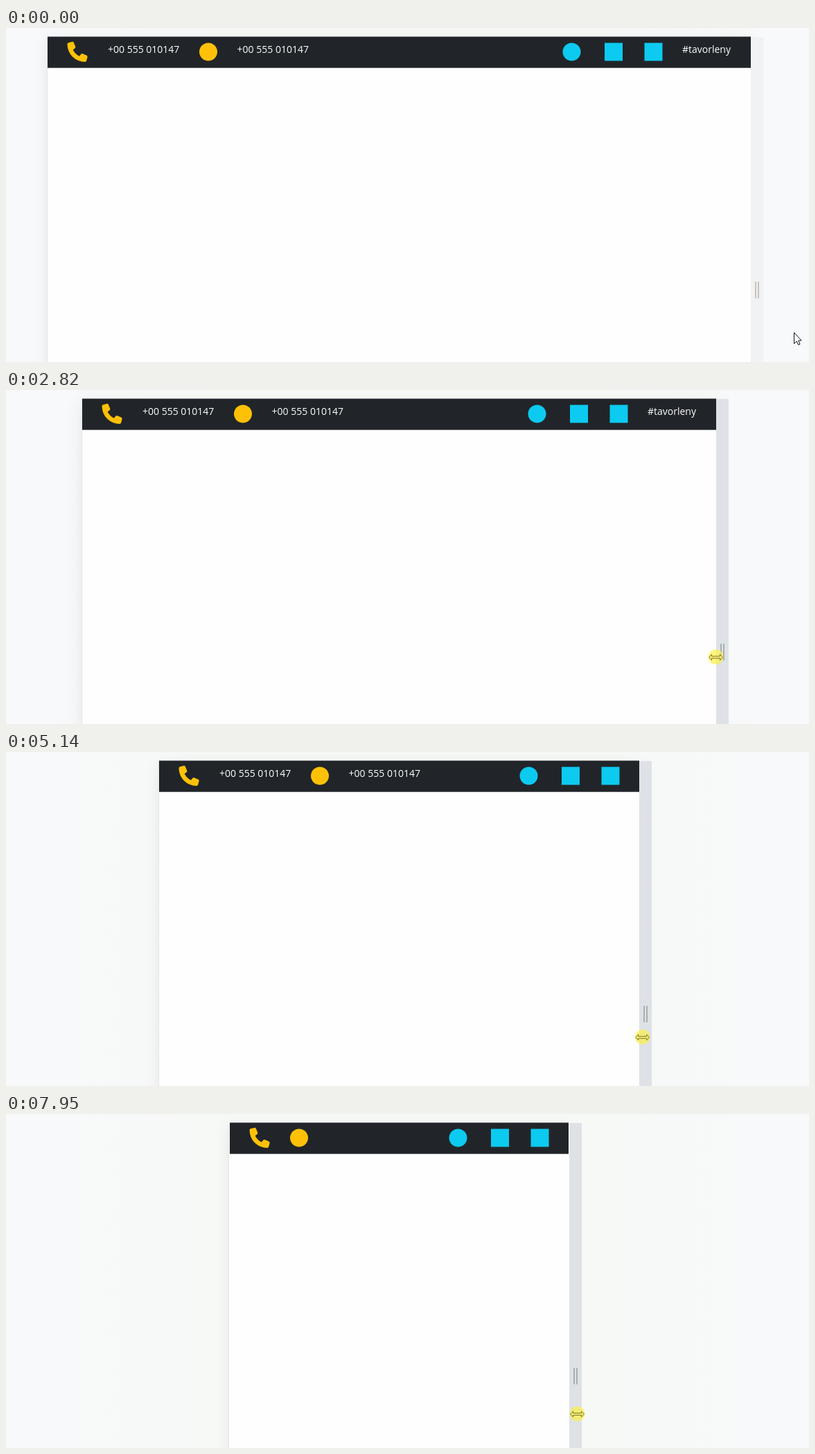
These frames come from a looping animation (1159 by 483 pixels, 8 s). An HTML page:

```html
<!DOCTYPE html>
<html lang="en">
<head>
<meta charset="utf-8">
<title>Responsive top bar</title>
<style>
  html, body { margin: 0; width: 100%; height: 100%; overflow: hidden; background: #f7f9fa; }
  svg { display: block; }
  text { font: 14px "Open Sans", "Noto Sans", sans-serif; fill: #fff; }
  #panel { fill: #fefefe; filter: drop-shadow(0 6px 11px rgba(0, 0, 0, .08)); }
  .warn { fill: #ffc107; }
  .info { fill: #0dcaf0; }
</style>
</head>
<body>
<svg width="1159" height="483" viewBox="0 0 1159 483">
  <defs>
    <linearGradient id="back">
      <stop offset="0" stop-color="#f8f9fb"/>
      <stop offset=".25" stop-color="#f7f9f7"/>
      <stop offset=".75" stop-color="#f7f9f7"/>
      <stop offset="1" stop-color="#f8f9fb"/>
    </linearGradient>
  </defs>
  <rect width="1159" height="483" fill="url(#back)"/>
  <rect id="panel" y="12.5" height="520"/>
  <rect id="edge" y="13" width="1" height="470" fill="#e3e6e5"/>
  <rect id="bar" y="12.5" height="45.2" fill="#212529"/>

  <g id="left">
    <path class="warn" transform="translate(28.5 19.8) scale(.455)" d="M20.6 3A5 5 0 0 0 14.7 .2L3.7 3.2A5 5 0 0 0 0 8A56 56 0 0 0 56 64A5 5 0 0 0 60.8 60.3L63.8 49.3A5 5 0 0 0 60.9 43.4L48.9 38.4A5 5 0 0 0 43.1 39.9L38.1 46A42 42 0 0 1 18 25.9L24.2 20.9A5 5 0 0 0 25.6 15.1Z"/>
    <text class="phone" x="87" y="36">+00 555 010147</text>
    <circle id="chat" class="warn" cy="34.5" r="13"/>
    <text class="phone" x="273.6" y="36">+00 555 010147</text>
  </g>

  <g id="social" class="info">
    <circle cx="-159.5" cy="34.5" r="13"/>
    <rect x="-112" y="21.5" width="26" height="26"/>
    <rect x="-54.5" y="21.5" width="26" height="26"/>
  </g>
  <text id="tag" y="36">#tavorleny</text>

  <g id="handle">
    <rect id="strip" y="13" width="18" height="470"/>
    <path id="grip" d="M7 367V391M11 367V391" stroke-width="1.5"/>
  </g>

  <path id="arrow" d="M.5 .5V16.5L4.2 13L6.6 18.2L9 17.2L6.7 12H11.2Z" fill="#fff" stroke="#111"/>
  <g id="resize">
    <circle id="press" r="10.8" fill="#fdf03c" fill-opacity=".66"/>
    <path id="arrows" d="M-10 .5L-6-3.7V-1H6V-3.7L10 .5L6 4.7V2H-6V4.7Z"/>
  </g>
</svg>

<script>
const LOOP = 8000, STEP = 66, CENTRE_SUM = 1135;
const TAG_MIN = 893, PHONE_MIN = 691;
const ARRIVE = 860, PRESS = 1190;

// Drag: time, panel left, pointer x, pointer y
const drag = [
  [1520, 60, 1082.5, 374.5],
  [1590, 61, 1077.5, 375.5],
  [2820, 109.5, 1024.5, 386],
  [4410, 183, 956.5, 405],
  [5930, 263, 877.5, 420],
  [7080, 324, 816.5, 432.5],
  [7340, 328.5, 812, 433],
  [7600, 328.5, 812, 433],
  [7950, 322, 824.5, 433.5]
];

const el = id => document.getElementById(id);
const phones = document.querySelectorAll(".phone");
const set = (id, attrs) => {
  for (const name in attrs) el(id).setAttribute(name, attrs[name]);
};
const move = (id, x, y = 0) => set(id, { transform: `translate(${x} ${y})` });
const show = (node, on) => node.setAttribute("visibility", on ? "visible" : "hidden");
const clamp = k => Math.min(1, Math.max(0, k));
const frame = t => Math.floor(t / STEP);

function bezier(a, b, c, d, k) {
  const m = 1 - k;
  return m * m * m * a + 3 * m * m * k * b + 3 * m * k * k * c + k * k * k * d;
}

// Panel edge and pointer, both held for one screen refresh.
function pose(t) {
  const f = frame(t);
  if (t < drag[0][0]) {
    const k = clamp(f / frame(ARRIVE));
    return [60, bezier(1137, 1160, 1145, 1082.5, k), bezier(440, 395, 350, 374.5, k)];
  }
  let i = 0;
  while (i < drag.length - 2 && t >= drag[i + 1][0]) i++;
  const [t0, ...a] = drag[i], [t1, ...b] = drag[i + 1];
  const k = clamp((f - frame(t0)) / (frame(t1) - frame(t0)));
  const [left, x, y] = a.map((v, j) => v + (b[j] - v) * k);
  return [Math.round(left), x, y];
}

function draw(t) {
  const [left, px, py] = pose(t);
  const right = CENTRE_SUM - left;

  // The page inside repaints one step late while the panel widens.
  const barLeft = Math.max(left, pose(t - STEP)[0]);
  const barRight = CENTRE_SUM - barLeft;
  const width = barRight - barLeft;
  const hasPhone = width >= PHONE_MIN, hasTag = width >= TAG_MIN;

  set("panel", { x: left, width: right - left });
  set("edge", { x: left - 1 });
  set("bar", { x: barLeft, width });
  move("left", barLeft);
  set("chat", { cx: hasPhone ? 232 : 100 });
  phones.forEach(p => show(p, hasPhone));
  move("social", barRight - (hasTag ? 99 : 0));
  move("tag", barRight - 99);
  show(el("tag"), hasTag);

  const hover = px < right + 18, pressed = t >= PRESS;
  move("handle", right);
  set("strip", { fill: hover ? "#dee2e6" : "#f1f2f4" });
  set("grip", { stroke: hover ? "#98a09a" : "#bcb4a2" });

  move("arrow", px, py);
  move("resize", px, py);
  show(el("arrow"), !hover);
  show(el("resize"), hover);
  set("press", { "fill-opacity": pressed ? .66 : 0 });
  set("arrows", pressed
    ? { fill: "#f3ea78", stroke: "#7d7626" }
    : { fill: "#fff", stroke: "#111" });
}

const origin = performance.now();
function tick() {
  draw((performance.now() - origin) % LOOP);
  requestAnimationFrame(tick);
}
tick();
</script>
</body>
</html>
```
